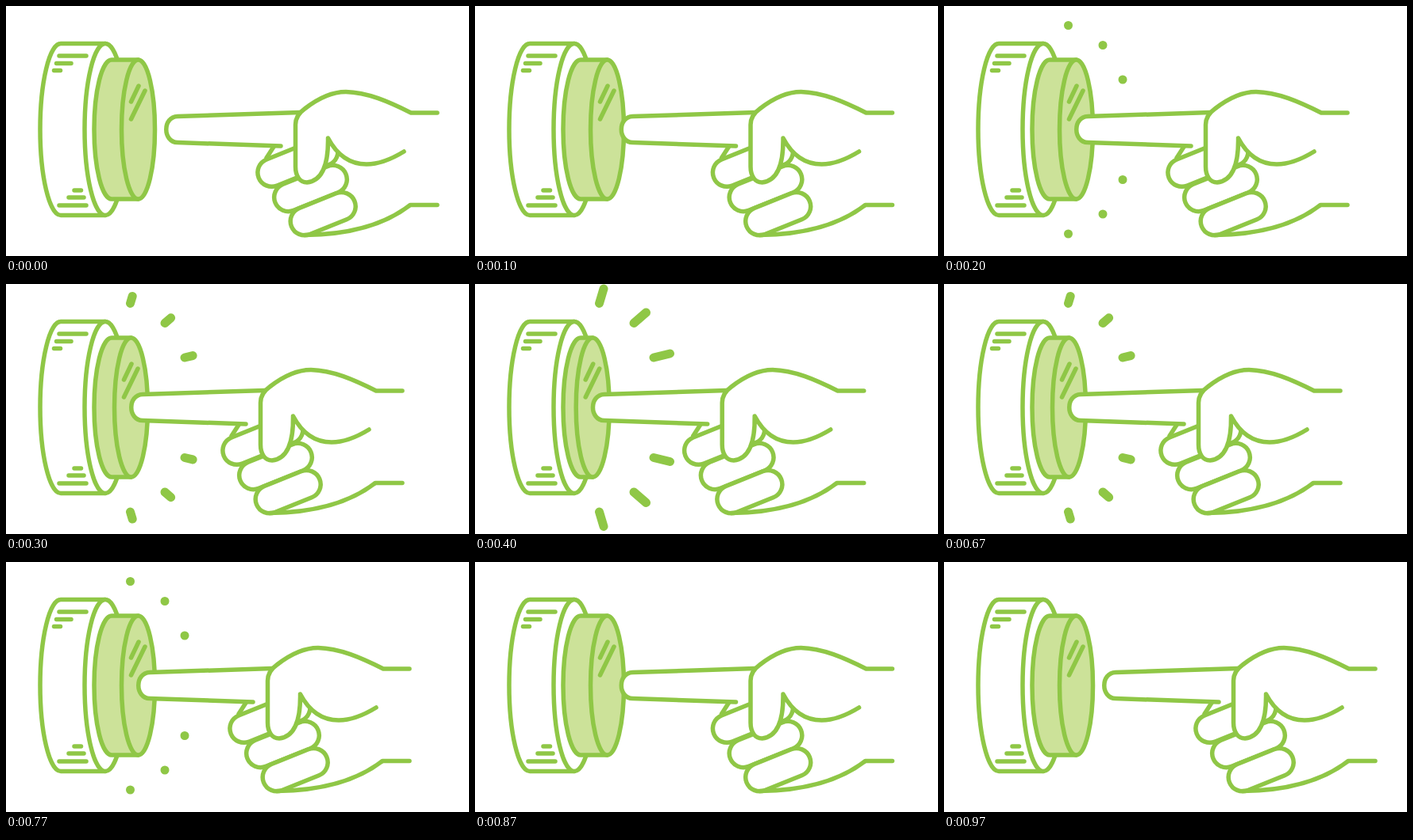
An HTML page for the animation above (1.07 s loop, 583 px wide and 316 px high).

```html
<!DOCTYPE html>
<html lang="en">
<head>
<meta charset="utf-8">
<title>Finger pressing a button</title>
<style>
  html, body { margin: 0; width: 100%; height: 100%; overflow: hidden; background: #fff; }
  svg { display: block; }
  .art { fill: #fff; stroke: #8fc746; stroke-width: 5.5; stroke-linecap: round; stroke-linejoin: round; }
  .tint { fill: #cce299; }
  .line { fill: none; }
  #rays { fill: none; stroke-width: 11; }
</style>
</head>
<body>
<svg class="art" width="583" height="316" viewBox="0 0 583 316">
  <g id="base">
    <path d="M125 47.5H69A26 108.5 0 0 0 69 264.5H125"/>
    <ellipse cx="125" cy="156" rx="26" ry="108.5"/>
    <path class="line" d="M67 63H101M63.5 72.5H82M60.5 81.5H68.5M86 233H94.5M79 242H98M67 252H101"/>
  </g>

  <path id="side" class="tint"/>
  <g id="cap">
    <ellipse class="tint" cx="166.5" cy="156" rx="21" ry="88"/>
    <path class="line" d="M167 101L157.5 121M175 107L157.5 143"/>
  </g>

  <path id="rays"/>

  <g id="hand">
    <path class="line" d="M337 178L328 192"/>
    <g id="fingers"></g>
    <path d="M370 134.5L216 139.5C197 140 197 172 216 172.5L346 177"/>
    <path d="M543 135H510C482 121 455 109 428 108.5C408 108.5 390 119 376 130C369 135 364.5 141 364.5 150V203C364.5 215 370 223 379 223C398 221 406 200 405.5 167C415 185 430 200 454 200C472 200 488 192 501 184"/>
    <path class="line" d="M376 289.5C428 289 475 278 509 251.5H543"/>
  </g>
</svg>
<script>
const $ = id => document.getElementById(id);
const LOOP = 1070, STEP = 100, RELEASE = 670;
const REACH = [0, 17.5, 35, 44, 53.3];  // hand travel for each pose
const CONTACT = 35;                     // travel at which the finger meets the cap
const FULL_PRESS = REACH[4] - CONTACT;

// Curled fingers: left end centre and length
const R = 17.8;
$('fingers').innerHTML = [[334.7, 210.5, 70.6], [355.5, 241.8, 60.4], [376, 272, 50]]
  .map(([x, y, len]) => `<rect x="${-R}" y="${-R}" width="${len + 2 * R}" height="${2 * R}" rx="${R}"
    transform="translate(${x} ${y}) rotate(-22)"/>`).join('');

// Upper rays: start point and full extent; the lower ones mirror them
const RAYS = [[156.5, 24.5, 5.5, -18.5], [200, 49.5, 15.5, -13.5], [225, 93, 20.5, -5]];
const MIRROR = 312.5;

function rayPath(grow) {
  return RAYS.map(([x, y, dx, dy]) =>
    `M${x} ${y}l${dx * grow} ${dy * grow}M${x} ${MIRROR - y}l${dx * grow} ${-dy * grow}`).join('');
}

function poseAt(t) {
  return t < RELEASE
    ? Math.min(4, Math.floor(t / STEP))
    : Math.max(0, 3 - Math.floor((t - RELEASE) / STEP));
}

function draw(t) {
  const reach = REACH[poseAt(t)];
  const press = Math.max(0, reach - CONTACT);
  $('hand').setAttribute('transform', `translate(${-reach})`);
  $('cap').setAttribute('transform', `translate(${-press})`);
  $('side').setAttribute('d', `M${166.5 - press} 68H133A22 88 0 0 0 133 244H${166.5 - press}`);
  $('rays').setAttribute('d', reach < CONTACT ? '' : rayPath(press / FULL_PRESS));
}

const start = performance.now();
function tick() {
  draw((performance.now() - start) % LOOP);
  requestAnimationFrame(tick);
}
tick();
</script>
</body>
</html>
```
